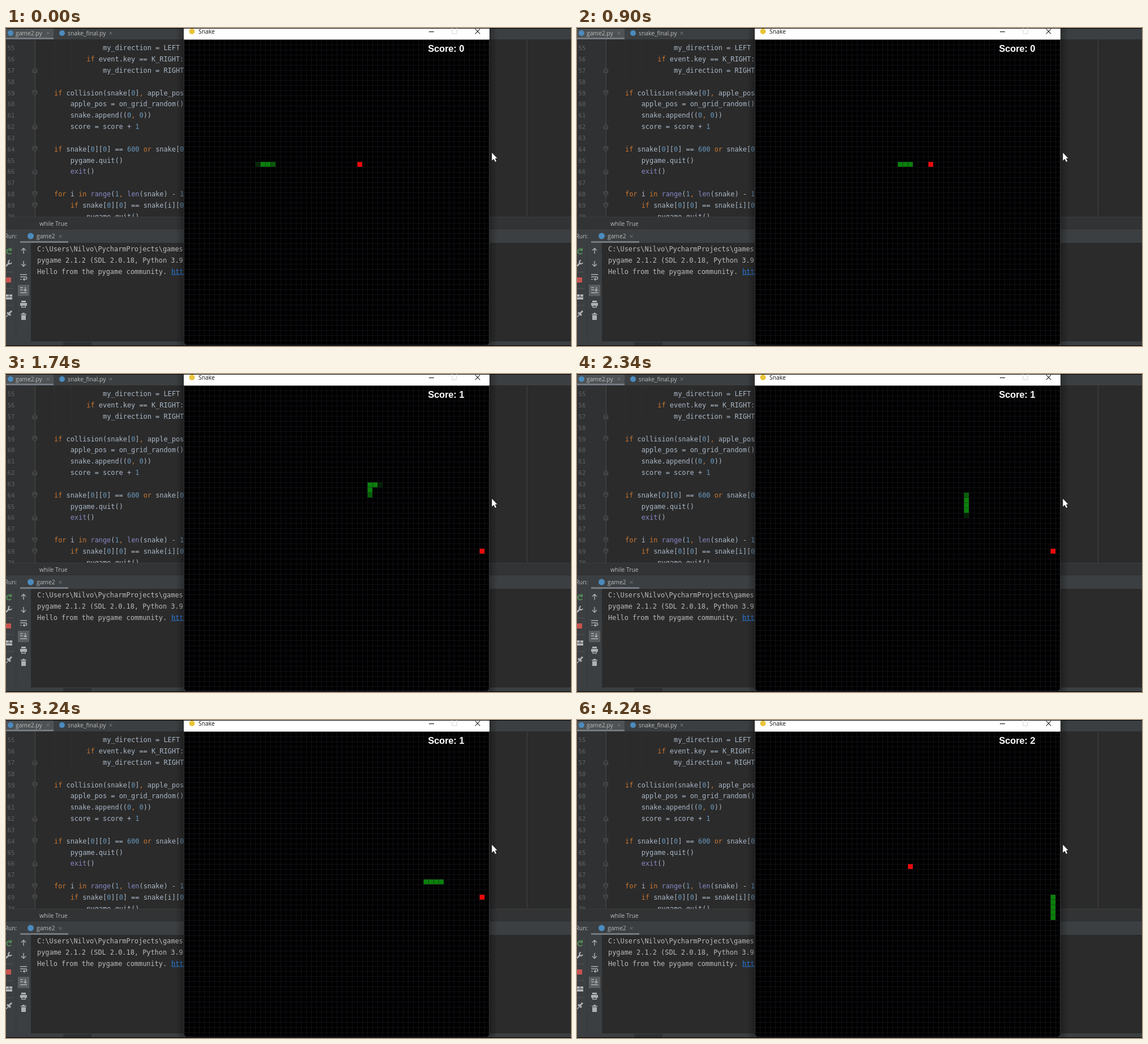
An HTML page with a canvas for the animation above (4280 ms loop, 998 by 561 pixels).

```html
<!DOCTYPE html>
<html lang="en">
<head>
<meta charset="utf-8">
<title>Snake</title>
<style>
html, body { margin: 0; width: 100%; height: 100%; overflow: hidden; background: #2b2b2b; }
canvas { display: block; }
</style>
</head>
<body>
<canvas id="stage" width="998" height="561"></canvas>
<script>
const W = 998, H = 561;
const LOOP = 4280, FRAME = 1001 / 30, LAST = 127;
const CELL = 9, GX = 314, GY = 20.5, SIZE = 540;
const MONO = '11.9px "DejaVu Sans Mono", monospace';
const UI = '10.3px "Open Sans", "Noto Sans", sans-serif';
const COLORS = { t: '#a9b7c6', k: '#cc7832', n: '#6897bb', b: '#8888c6' };

const ctx = document.getElementById('stage').getContext('2d');

function rect(g, x, y, w, h, color) {
  g.fillStyle = color;
  g.fillRect(x, y, w, h);
}

function text(g, str, x, y, color, font) {
  g.font = font;
  g.fillStyle = color;
  g.fillText(str, x, y);
}

function dot(g, x, y, r, color) {
  g.fillStyle = color;
  g.beginPath();
  g.arc(x, y, r, 0, 7);
  g.fill();
}

function path(g, d, x, y, color, width = 1.4) {
  g.save();
  g.translate(x, y);
  g.strokeStyle = color;
  g.lineWidth = width;
  g.stroke(new Path2D(d));
  g.restore();
}

const cross = (g, x, y, r, color, w) =>
  path(g, `M${-r} ${-r}L${r} ${r}M${r} ${-r}L${-r} ${r}`, x, y, color, w);

// Code lines: [indent in characters, source]
const CODE = [
  [12, 'my_direction = LEFT'],
  [8, 'if event.key == K_RIGHT:'],
  [12, 'my_direction = RIGHT'],
  [0, ''],
  [0, 'if collision(snake[0], apple_pos):'],
  [4, 'apple_pos = on_grid_random()'],
  [4, 'snake.append((0, 0))'],
  [4, 'score = score + 1'],
  [0, ''],
  [0, 'if snake[0][0] == 600 or snake[0][1]'],
  [4, 'pygame.quit()'],
  [4, 'exit()'],
  [0, ''],
  [0, 'for i in range(1, len(snake) - 1):'],
  [4, 'if snake[0][0] == snake[i][0]'],
  [8, 'pygame.quit()']
];

function kind(word) {
  if (/^(if|or|for|in|,)$/.test(word)) return 'k';
  if (/^\d+$/.test(word)) return 'n';
  if (/^(exit|range|len)$/.test(word)) return 'b';
  return 't';
}

function drawCode(g) {
  const cw = 7.165, pitch = 19.84;
  g.save();
  g.beginPath();
  g.rect(0, 20, GX, 314);
  g.clip();
  rect(g, 0, 20, 51, 314, '#303132');
  rect(g, 51, 20, 1, 314, '#484a4b');
  rect(g, 85, 20, 1, 65, '#323232');
  rect(g, 114, 20, 1, 65, '#323232');
  CODE.forEach(([indent, src], i) => {
    const y = 39.2 + i * pitch;
    text(g, String(55 + i), 2.5, y, '#606366', '10.6px "DejaVu Sans Mono", monospace');
    let x = 85 + indent * cw;
    for (const word of src.match(/\w+|,|[^\w,]+/g) || []) {
      text(g, word, x, y, COLORS[kind(word)], MONO);
      x += word.length * cw;
    }
  });
  const fold = (line, dir) => {
    const y = 35 + (line - 55) * pitch;
    const d = `M-3.5 ${-4 * dir}H3.5V${dir}L0 ${4 * dir}L-3.5 ${dir}ZM-2 ${-dir}H2`;
    rect(g, 47.5, y - 4, 7, 8, '#303132');
    path(g, d, 51, y, '#5c5f61', 0.9);
  };
  [59, 64, 68, 69].forEach(n => fold(n, 1));
  [57, 62, 66].forEach(n => fold(n, -1));
  g.restore();
}

function drawTabs(g) {
  rect(g, 0, 1, W, 19, '#3c3f41');
  rect(g, 0, 1, 84, 19, '#4e5254');
  rect(g, 0, 17, 84, 3, '#747a80');
  dot(g, 8, 9, 5, '#4b8bbe');
  text(g, 'game2.py', 17, 12.7, '#bbbbbb', UI);
  cross(g, 74, 9, 2.5, '#777b7e', 1);
  dot(g, 99, 9, 5, '#4b8bbe');
  text(g, 'snake_final.py', 109, 12.7, '#bbbbbb', UI);
  cross(g, 185, 9, 2.5, '#777b7e', 1);
}

function drawTools(g) {
  const c = '#afb1b3';
  rect(g, 0, 379, 44, 174, '#3c3f41');
  rect(g, 17, 379, 1, 174, '#35383a');
  [430, 459, 489].forEach(y => rect(g, 0, y, 13, 1, '#515456'));

  path(g, 'M4 3A4.3 4.3 0 1 1 3 -3.5M4 -5.5V-1.5H0', 5, 394, '#56a05c', 1.7);
  path(g, 'M-4 5L2 -1', 4, 415, c, 2.6);
  path(g, 'M3 -5A3 3 0 1 0 6 -1', 4, 415, c, 2);
  rect(g, 0, 440, 9, 9, '#c75450');
  rect(g, 0, 470, 5, 4, c);
  rect(g, 6, 470, 5, 4, c);
  rect(g, 0, 475, 11, 4, c);
  path(g, 'M-5 6L0 1', 5, 504, c, 1.3);
  path(g, 'M-3 -1L3 4M0 1L5 -4', 5, 503, c, 3);

  path(g, 'M0 5V-4M-4 -0.5L0 -4.5L4 -0.5', 31, 393, c);
  path(g, 'M0 -5V4M-4 0.5L0 4.5L4 0.5', 31, 416, c);
  path(g, 'M-6 -4H6M-6 0H3.5A2.2 2.2 0 0 1 3.5 4.4H0M2 2L-0.5 4.4L2 6.5M-6 4.4H-3', 31, 439, c);
  rect(g, 21, 453, 20, 20, '#5a5e61');
  path(g, 'M-6 -4H-1M-6 0H-1M-6 5H6M3 -5V2M0.5 -0.5L3 2L5.5 -0.5', 31, 462, c);
  rect(g, 27, 481, 8, 3, c);
  rect(g, 25, 485, 12, 5, c);
  path(g, 'M-3.3 0H3.3V4.5H-3.3Z', 31, 488, c, 1.3);
  rect(g, 26, 504, 10, 1.5, c);
  rect(g, 29, 502.5, 4, 2, c);
  rect(g, 27, 506.5, 8, 8.5, c);
}

function drawRun(g) {
  rect(g, 0, 334, W, 21, '#313335');
  rect(g, 0, 333, W, 1, '#3a3c3d');
  text(g, 'while True', 59, 348.8, '#bbbbbb', UI);
  rect(g, 0, 355, W, 24, '#3c3f41');
  rect(g, 0, 354, W, 1, '#2b2d2e');
  text(g, 'Run:', -2.5, 371, '#bbbbbb', UI);
  dot(g, 43.5, 367, 5.5, '#4b8bbe');
  text(g, 'game2', 54, 371, '#bbbbbb', UI);
  cross(g, 96, 367.5, 2.5, '#777b7e', 1);
  rect(g, 25, 376, 85, 3, '#747a80');
  drawTools(g);

  [
    'C:\\Users\\Nilvo\\PycharmProjects\\games',
    'pygame 2.1.2 (SDL 2.0.18, Python 3.9',
    'Hello from the pygame community.'
  ].forEach((s, i) => text(g, s, 55, 393.9 + i * 19.8, '#bbbbbb', MONO));
  text(g, 'htt', 292, 433.5, '#287bde', MONO);
  rect(g, 292, 434.5, 22, 1, '#287bde');

  rect(g, 0, 553, W, 7, '#3c3f41');
  rect(g, 101, 554, 50, 6, '#2e3032');
}

// Soft shadow fading away from one side of the window
function drawShadow(g, x, reach) {
  const fade = g.createLinearGradient(x, 0, x + reach, 0);
  fade.addColorStop(0, 'rgba(0,0,0,0.28)');
  fade.addColorStop(1, 'rgba(0,0,0,0)');
  rect(g, x, 1, reach, 559, fade);
}

function drawWindow(g) {
  drawShadow(g, GX, -14);
  drawShadow(g, GX + SIZE, 14);
  g.fillStyle = '#000000';
  g.beginPath();
  g.roundRect(GX, 1, SIZE, 559, [0, 0, 6, 6]);
  g.fill();
  rect(g, GX, 1, SIZE, GY - 1, '#ffffff');
  dot(g, 328.5, 6, 5, '#e8c53a');
  text(g, 'Snake', 340, 10, '#111111', UI);
  rect(g, 747, 6, 9, 1.2, '#222222');
  path(g, 'M0 -4V8H8V-4', 788, 2, '#d4d4d4', 1);
  cross(g, 833, 6, 4.3, '#222222', 1.1);
  g.strokeStyle = '#303238';
  g.lineWidth = 1;
  g.beginPath();
  g.moveTo(GX + 0.5, GY);
  g.lineTo(GX + 0.5, 553);
  g.arcTo(GX + 0.5, 559.5, 321, 559.5, 6);
  g.lineTo(848, 559.5);
  g.arcTo(853.5, 559.5, 853.5, 553, 6);
  g.lineTo(853.5, GY);
  g.stroke();
  for (let i = 1; i < 60; i++) {
    rect(g, GX + i * CELL, 21, 1, 538, '#111116');
    rect(g, GX + 1, 20 + i * CELL, SIZE - 2, 1, '#111116');
  }
}

function drawPointer(g) {
  const p = new Path2D('M858.3 220V234L861.6 231.1L864 236.2L866.3 235.1L863.9 230.2L867.6 229.8Z');
  g.lineWidth = 1;
  g.strokeStyle = '#000000';
  g.stroke(p);
  g.fillStyle = '#ffffff';
  g.fill(p);
}

function makeDesk() {
  const c = document.createElement('canvas');
  c.width = W;
  c.height = H;
  const g = c.getContext('2d');
  rect(g, 0, 0, W, H, '#2b2b2b');
  drawCode(g);
  drawTabs(g);
  rect(g, 920, 20, 1, 313, '#424344');
  drawRun(g);
  rect(g, 0, 0, W, 1, '#000000');
  rect(g, 0, 560, W, 1, '#000000');
  drawWindow(g);
  drawPointer(g);
  return c;
}

// The head's route as straight runs: [dx, dy, steps]
const START = 10;
const ROUTE = [];
let hx = 7, hy = 24;
for (const [dx, dy, n] of [
  [1, 0, 29], [0, -1, 5], [1, 0, 5], [0, 1, 10], [1, 0, 17], [0, 1, 7]
]) {
  for (let i = 0; i < n; i++) ROUTE.push([hx += dx, hy += dy]);
}
const APPLES = [[34, 24], [58, 32], [30, 26]];

function drawCell([cx, cy], color) {
  rect(ctx, GX + 0.7 + cx * CELL, GY - 0.1 + cy * CELL, 8.4, 8.4, color);
}

// One game tick: apple, body and score
function drawTick(n, alpha) {
  const score = n < 18 ? 0 : n < 60 ? 1 : 2;
  const head = n + START - 1;
  const body = ROUTE.slice(head - 2 - score, head + 1);
  const [ax, ay] = APPLES[score];
  ctx.globalAlpha = alpha;
  if (!body.some(([x, y]) => x === ax && y === ay)) drawCell([ax, ay], '#f00808');
  for (const cell of body) drawCell(cell, '#0a800a');
  text(ctx, 'Score: ' + score, 745.5, 42.2, '#ffffff', 'bold 16.2px "Liberation Sans", Arial, sans-serif');
}

const desk = makeDesk();

function draw(now) {
  const k = Math.min(LAST, Math.floor((now % LOOP + 5) / FRAME));
  const n = k >> 1;
  ctx.globalAlpha = 1;
  ctx.globalCompositeOperation = 'source-over';
  ctx.drawImage(desk, 0, 0);
  ctx.globalCompositeOperation = 'lighter';
  if (k % 2) {
    drawTick(n, 1);
  } else {
    // Even frames mix two ticks
    const mix = Math.max(0.25, 0.7 - k * 0.0087);
    drawTick(n - 1, 1 - mix);
    drawTick(n, mix);
  }
}

function loop() {
  draw(performance.now());
  requestAnimationFrame(loop);
}
loop();
</script>
</body>
</html>
```
